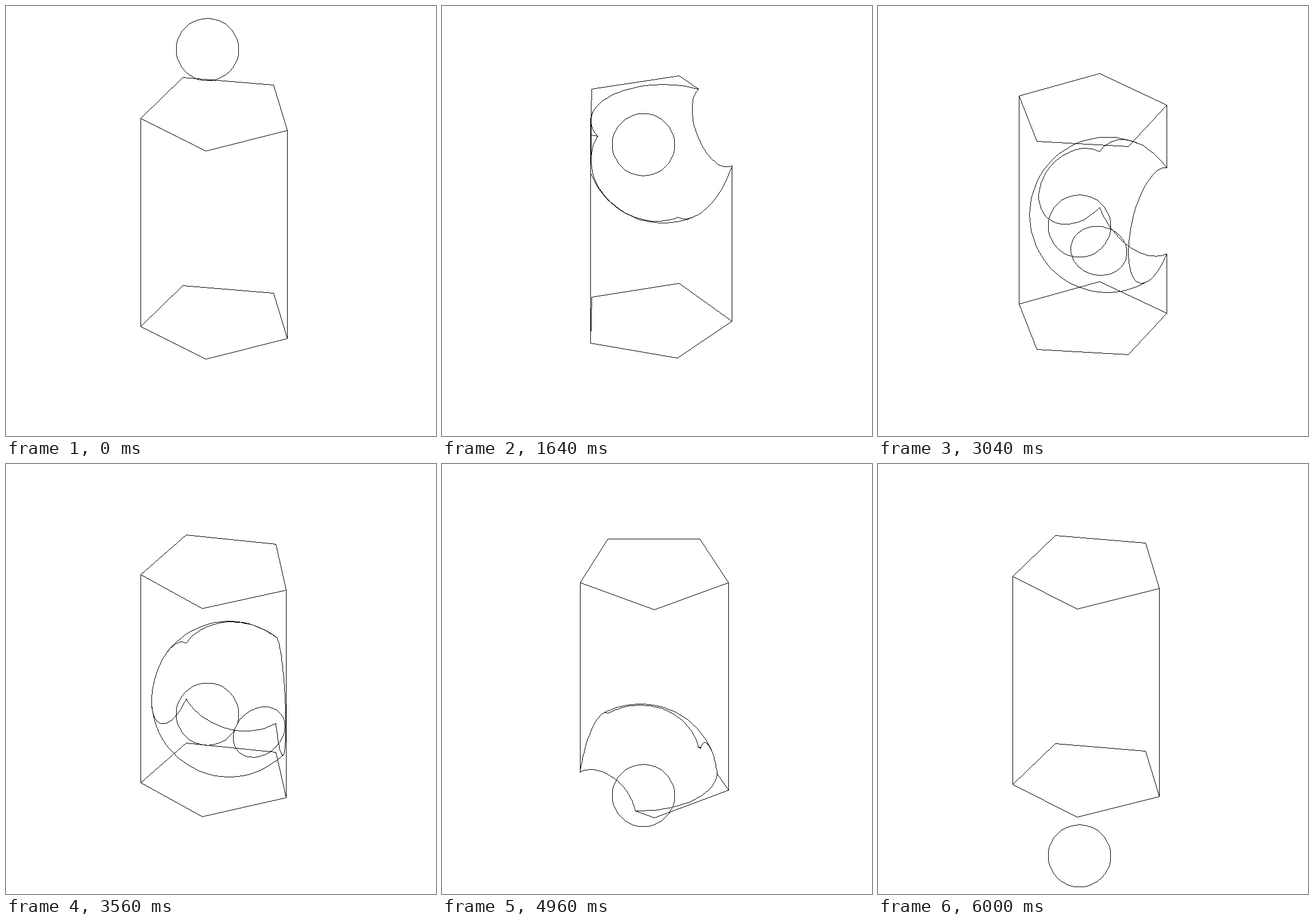
Write an HTML page with a canvas that moves like this. It is 748x748 px and loops after 6040 ms.

```html
<!DOCTYPE html>
<html lang="en">
<head>
<meta charset="utf-8">
<title>Sphere cutting through a prism</title>
<style>
  html, body { margin: 0; width: 100%; height: 100%; overflow: hidden; background: #fff; }
  canvas { display: block; width: 748px; height: 748px; }
</style>
</head>
<body>
<canvas id="stage" width="748" height="748"></canvas>
<script>
const ctx = document.getElementById('stage').getContext('2d');
const { PI, sin, cos, abs, sign, floor, hypot, sqrt } = Math;
const RAD = PI / 180, TAU = 2 * PI;

const STEP = 40, STEPS = 151;
const TILT = 0.5, RISE = sqrt(0.75);        // orthographic view, 30 degrees from above
const CX = 369.05, TOP = 185.4;
const R = 135.8, H = 361.85 / RISE, APOTHEM = R * cos(36 * RAD);
const BALL = 135.2, OFFSET = 32.6;          // ball radius, its distance from the prism axis
const FALL = 4.04, TURN = -2.398;           // per step
const SIDES = [0, 1, 2, 3, 4];

// x to the right, w towards the viewer, z down
const project = ([x, w, z]) => [CX + x, TOP + TILT * w + RISE * z];

// One-pixel line without smoothing
function line(a, b) {
  let [x, y] = a.map(floor);
  const [ex, ey] = b.map(floor);
  const dx = abs(ex - x), dy = abs(ey - y);
  const sx = sign(ex - x), sy = sign(ey - y);
  let err = dx - dy;
  for (;;) {
    ctx.fillRect(x, y, 1, 1);
    if (x === ex && y === ey) return;
    const e = 2 * err;
    if (e > -dy) { err -= dy; x += sx; }
    if (e < dx) { err += dx; y += sy; }
  }
}

function polyline(points) {
  for (let i = 1; i < points.length; i++) line(points[i - 1], points[i]);
}

// Draws the parts of curve(0..1) for which keep() holds.
// Samples finely to find the ends, then joins every fourth point.
function trace(curve, keep, straight) {
  const count = 360;
  let run = [];
  const flush = () => {
    if (run.length > 1) polyline(straight ? [run[0], run[run.length - 1]] : run);
    run = [];
  };
  const crossing = (lo, hi, loKept) => {
    for (let i = 0; i < 14; i++) {
      const mid = (lo + hi) / 2;
      if (keep(curve(mid)) === loKept) lo = mid; else hi = mid;
    }
    return project(curve((lo + hi) / 2));
  };
  let before = false;
  for (let i = 0; i <= count; i++) {
    const u = i / count, p = curve(u), kept = keep(p);
    if (i && kept !== before) run.push(crossing((i - 1) / count, u, before));
    if (!kept) flush();
    else if (i % 4 === 0) run.push(project(p));
    before = kept;
  }
  flush();
}

const segment = (a, b) => u => a.map((v, i) => v + (b[i] - v) * u);
const circle = (c, r, a, b) => u =>
  c.map((v, i) => v + r * (cos(TAU * u) * a[i] + sin(TAU * u) * b[i]));

function draw(n) {
  ctx.fillStyle = '#fff';
  ctx.fillRect(0, 0, 748, 748);
  ctx.fillStyle = '#000';

  const turn = (27.1 + TURN * n) * RAD;
  const place = (159.6 + TURN * n) * RAD;
  const ball = [OFFSET * cos(place), OFFSET * sin(place), (62.5 + FALL * n - TOP) / RISE];

  const corners = SIDES.map(k => turn + k * 72 * RAD);
  const normals = corners.map(a => [cos(a + PI / 5), sin(a + PI / 5)]);
  const corner = (k, z) => [R * cos(corners[k % 5]), R * sin(corners[k % 5]), z];

  const outsideBall = p => hypot(p[0] - ball[0], p[1] - ball[1], p[2] - ball[2]) > BALL;
  const inPrism = ([x, w, z]) => z > -0.01 && z < H + 0.01 &&
    normals.every(([nx, nw]) => x * nx + w * nw < APOTHEM + 0.01);

  // Prism: both caps and the outermost upright edges
  for (const k of SIDES) {
    for (const z of [0, H]) trace(segment(corner(k, z), corner(k + 1, z)), outsideBall, true);
    const facing = normals[k][1] > 0, previous = normals[(k + 4) % 5][1] > 0;
    if (facing !== previous) trace(segment(corner(k, 0), corner(k, H)), outsideBall, true);
  }

  // Where the ball meets each flat face
  const cut = (gap, c, a, b) => {
    if (abs(gap) < BALL) trace(circle(c, sqrt(BALL * BALL - gap * gap), a, b), inPrism);
  };
  for (const z of [0, H]) cut(z - ball[2], [ball[0], ball[1], z], [1, 0, 0], [0, 1, 0]);
  for (const [nx, nw] of normals) {
    const gap = APOTHEM - ball[0] * nx - ball[1] * nw;
    cut(gap, [ball[0] + gap * nx, ball[1] + gap * nw, ball[2]], [-nw, nx, 0], [0, 0, 1]);
  }

  // Outline of the hollow
  trace(circle(ball, BALL, [1, 0, 0], [0, TILT, RISE]), inPrism);

  // Small falling circle
  const ring = [];
  for (let i = 0; i <= 40; i++) {
    const a = TAU * i / 40;
    ring.push([350.5 + 54.2 * cos(a), 75.7 + FALL * n + 54.2 * sin(a)]);
  }
  polyline(ring);
}

let shown = -1;
const start = performance.now();
function tick() {
  const n = floor((performance.now() - start) / STEP) % STEPS;
  if (n !== shown) draw(shown = n);
  requestAnimationFrame(tick);
}
tick();
</script>
</body>
</html>
```
